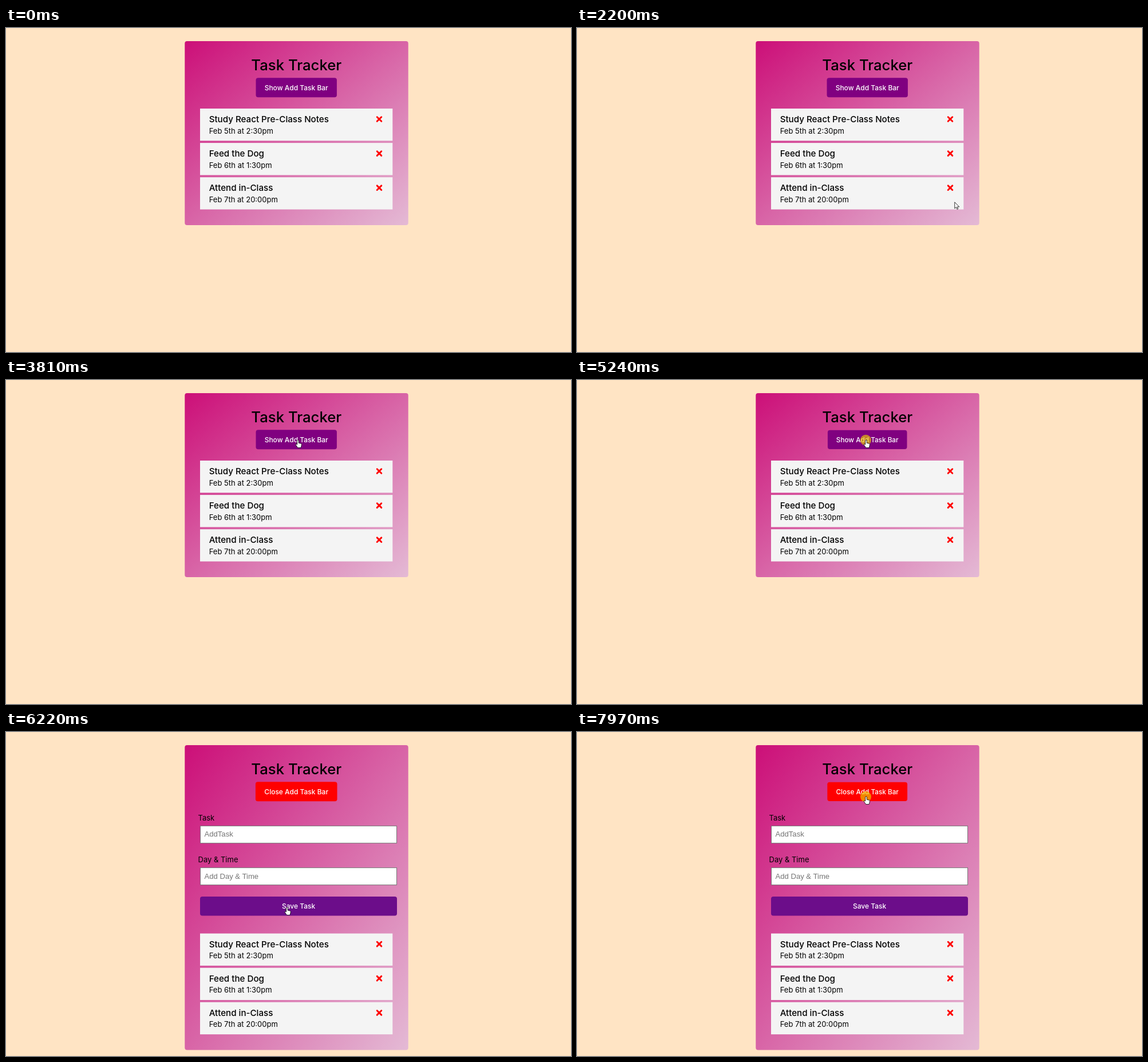
An HTML page for the animation above (8 s loop, 987 by 567 pixels).

```html
<!DOCTYPE html>
<html lang="en">
<head>
<meta charset="utf-8">
<title>Task Tracker</title>
<style>
  html, body { margin: 0; width: 100%; height: 100%; overflow: hidden; background: #ffe4c4; }
  svg { display: block; width: 987px; height: 567px; }
  text { font: 400 13px Inter, "Open Sans", sans-serif; }
  .mid { text-anchor: middle; }
  .title { font-size: 25.7px; font-weight: 500; }
  .name { font-size: 15.15px; font-weight: 500; }
  .btn { font-size: 12px; font-weight: 500; fill: #fff; }
  .hint { font: 13.1px "Liberation Sans", Arial, sans-serif; fill: #757575; }
  .field { fill: #fff; stroke: #767676; }
  .cross { stroke: #f00; stroke-width: 2.9; stroke-linecap: round; }
  #cursor path { fill: #fff; stroke: #000; stroke-width: .8; stroke-linejoin: round; }
  #cursor #beam { fill: none; stroke-width: 1; }
</style>
</head>
<body>
<svg viewBox="0 0 987 567">
  <defs>
    <linearGradient id="pink" x1="0" y1="0" x2="1" y2="1">
      <stop stop-color="#cc0f78"/>
      <stop offset="1" stop-color="#e4bad5"/>
    </linearGradient>
  </defs>
  <rect id="panel" x="312.3" y="23" width="390.4" rx="4" fill="url(#pink)"/>
  <text class="title mid" x="507.3" y="74">Task Tracker</text>
  <g id="toggle">
    <rect id="face" y="87.3" height="34" rx="4"/>
    <text id="caption" class="btn mid" x="507.2" y="108.6"></text>
  </g>
  <g id="form">
    <g id="fields"></g>
    <rect x="339" y="288" width="344" height="33.5" rx="4" fill="#6c0d8a"/>
    <text class="btn mid" x="511" y="308.6">Save Task</text>
  </g>
  <g id="list"></g>
  <circle id="click" r="9.5" fill="#ebcd00" opacity=".65"/>
  <g id="cursor">
    <path id="arrow" d="M0 0V11l2.6-2.3 1.7 3.8 1.7-.8-1.7-3.5H8z"/>
    <path id="hand" d="M-1.3 8V1.2a1.3 1.3 0 0 1 2.6 0V5.2l4.2 1q1 .3 1 1.5l-.6 3.5-.9 2.3h-5.3l-3.6-5.2q.2-1.5 1.5-1z"/>
    <path id="beam" d="M-2 -6h4M0 -6V6M-2 6h4"/>
  </g>
</svg>
<script>
const $ = id => document.getElementById(id);
const set = (id, attrs) => {
  for (const key in attrs) $(id).setAttribute(key, attrs[key]);
};
const show = (id, on) => $(id).style.display = on ? "" : "none";
const fill = (id, rows, row) => $(id).innerHTML = rows.map(row).join("");

const fields = [["Task", "AddTask"], ["Day &amp; Time", "Add Day &amp; Time"]];
fill("fields", fields, ([label, hint], i) => `
  <g transform="translate(335.5 ${155 + i * 73.2})">
    <text>${label}</text>
    <rect class="field" x="4" y="9.4" width="343" height="30"/>
    <text class="hint" x="11" y="28.4">${hint}</text>
  </g>`);

const tasks = [
  ["Study React Pre-Class Notes", "Feb 5th at 2:30pm"],
  ["Feed the Dog", "Feb 6th at 1:30pm"],
  ["Attend in-Class", "Feb 7th at 20:00pm"]
];
fill("list", tasks, ([name, date], i) => `
  <g transform="translate(339 ${141 + i * 60.1})">
    <rect width="336.3" height="56.3" fill="#f4f4f4"/>
    <text class="name" x="15.7" y="24.2">${name}</text>
    <text x="15.7" y="43.6">${date}</text>
    <path class="cross" d="M309.2 14.7l7.6 7.6m0-7.6l-7.6 7.6"/>
  </g>`);

const LOOP = 8000, ENTER = 130, PRESS = 5240, OPEN = 5300, PRESS_AGAIN = 7970;

// Pointer strokes: a smooth curve through evenly timed points, resting at its end
const strokes = [
  { from: ENTER, to: 740, pts: [[945, 538], [700, 325], [465, 14], [516, 22]] },
  { from: 940, to: 2200, pts: [[516, 22], [592, 95], [432, 82], [380, 150], [465, 365], [660, 305]] },
  { from: 2200, to: 3810, pts: [[660, 305], [520, 165], [412, 110], [450, 62], [522, 138], [510, 105]] },
  { from: 3810, to: 4970, pts: [[510, 105], [480, 108], [545, 112], [505, 105]] },
  { from: 5760, to: 7010, pts: [[505, 105], [489, 342], [512, 116]] },
  { from: 7010, to: 7570, pts: [[512, 116], [488, 114], [505, 113]] }
];

function pointer(t) {
  const { from, to, pts } = strokes.findLast(s => s.from <= t);
  const last = pts.length - 1;
  const pos = Math.min((t - from) / (to - from), 1) * last;
  const i = Math.min(Math.floor(pos), last - 1), k = pos - i;
  const at = n => pts[Math.max(0, Math.min(last, n))];
  return [0, 1].map(axis => {
    const [a, b, c, d] = [-1, 0, 1, 2].map(n => at(i + n)[axis]);
    return b + k / 2 * (c - a + k * (2 * a - 5 * b + 4 * c - d + k * (3 * (b - c) + d - a)));
  });
}

function shape(x, y, open) {
  const within = (left, top, right, bottom) => x > left && x < right && y > top && y < bottom;
  if (within(436, 87, 578, 121.5)) return "hand";
  if (open && within(339, 288, 683, 322)) return "hand";
  if (open && (within(339, 164, 683, 195) || within(339, 237, 683, 268))) return "beam";
  return "arrow";
}

function draw(now) {
  const t = now % LOOP;
  const open = t >= OPEN, moving = t >= ENTER;
  const pressed = t >= PRESS && t < OPEN || t >= PRESS_AGAIN;
  const width = open ? 142.6 : 141.4;

  set("panel", { height: open ? 533.5 : 322 });
  set("face", { x: 507.2 - width / 2, width, fill: open ? "#f00" : "#800080" });
  $("caption").textContent = (open ? "Close" : "Show") + " Add Task Bar";
  set("toggle", { transform: pressed ? "translate(507.2 104.3) scale(.98) translate(-507.2 -104.3)" : "" });
  set("list", { transform: `translate(0 ${open ? 211.6 : 0})` });
  show("form", open);
  show("cursor", moving);
  show("click", pressed);

  if (moving) {
    const [x, y] = pointer(t), kind = shape(x, y, open);
    set("cursor", { transform: `translate(${x} ${y})` });
    for (const id of ["arrow", "hand", "beam"]) show(id, id === kind);
    set("click", { cx: x - .5, cy: y + .3 });
  }
  requestAnimationFrame(draw);
}
requestAnimationFrame(draw);
</script>
</body>
</html>
```
